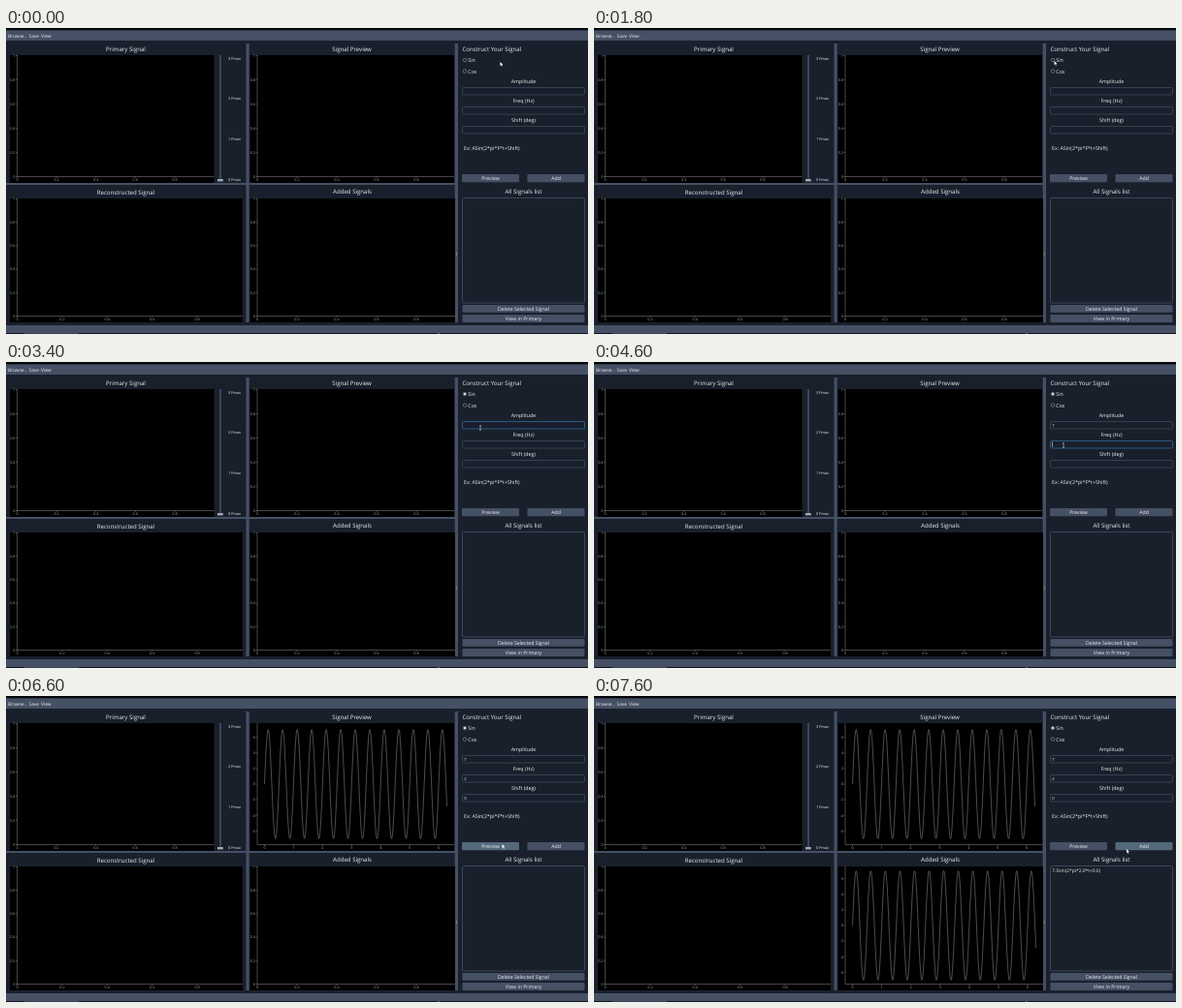
An HTML page with a canvas for the animation above (8000 ms loop, 600 by 316 pixels).

```html
<!DOCTYPE html>
<html lang="en">
<head>
<meta charset="utf-8">
<title>Signal composer</title>
<style>
html, body { margin: 0; width: 100%; height: 100%; overflow: hidden; background: #19202c; }
canvas { display: block; width: 600px; height: 316px; }
</style>
</head>
<body>
<canvas id="stage"></canvas>
<script>
const LOOP = 8000, STEP = 200;
const BG = '#19202c', BAR = '#465064', TEXT = '#eceef1', AXIS = '#767676';
const canvas = document.getElementById('stage');
const ctx = canvas.getContext('2d');
const ratio = window.devicePixelRatio || 1;
canvas.width = 600 * ratio;
canvas.height = 316 * ratio;
ctx.scale(ratio, ratio);
ctx.textRendering = 'geometricPrecision';

// Pointer stops: time, x, y
const pointerPath = [
  [0, 509.5, 35], [200, 479, 35], [800, 478, 35], [1400, 474.5, 34], [2200, 474.5, 34],
  [2800, 489, 68], [4200, 489, 68], [4600, 484, 86], [5200, 484, 86],
  [5600, 488.5, 105], [6000, 488.5, 105], [6400, 511.5, 153], [6800, 511.5, 153],
  [7200, 549, 158], [8000, 549, 158]
];

const fields = [
  { label: 'Amplitude', y: 61, value: '7', focus: 2800, typed: 3800, blur: 4400 },
  { label: 'Freq (Hz)', y: 81, value: '2', focus: 4400, typed: 5000, blur: 5600 },
  { label: 'Shift (deg)', y: 101, value: '0', focus: 5600, typed: 6000, blur: 6400 }
];

function rect(x, y, w, h, color) {
  ctx.fillStyle = color;
  ctx.fillRect(x, y, w, h);
}

function box(x, y, w, h, border) {
  ctx.beginPath();
  ctx.roundRect(x, y, w, h, 1);
  ctx.strokeStyle = border;
  ctx.lineWidth = 0.8;
  ctx.stroke();
}

function text(label, x, y, size, align = 'left', color = TEXT) {
  ctx.font = `${size}px "Open Sans", "Noto Sans", sans-serif`;
  ctx.textAlign = align;
  ctx.textBaseline = 'alphabetic';
  ctx.fillStyle = color;
  ctx.fillText(label, x, y + size * 0.36);
}

function line(x1, y1, x2, y2, color = AXIS, width = 0.6) {
  ctx.strokeStyle = color;
  ctx.lineWidth = width;
  ctx.beginPath();
  ctx.moveTo(x1, y1);
  ctx.lineTo(x2, y2);
  ctx.stroke();
}

function button(label, x, y, w, h, hover) {
  ctx.beginPath();
  ctx.roundRect(x, y, w, h, 1);
  ctx.fillStyle = hover ? '#546a7b' : BAR;
  ctx.fill();
  text(label, x + w / 2, y + h / 2, 5.2, 'center');
}

function plot({ x, y, right, bottom, unit, signal }) {
  rect(x, y, right - x, bottom - y, '#000');
  const left = x + 7.5, base = bottom - 6.5, top = y + 0.5;
  const middle = (top + base) / 2;
  line(left, y, left, base);
  line(left, base, right, base);
  const tickX = (label, px) => {
    line(px, base, px, base + 1.5);
    text(label, px, base + 3.6, 3.8, 'center', '#a5a5a5');
  };
  const tickY = (label, py) => {
    line(left - 1.5, py, left, py);
    text(label, left - 2, py, 3.8, 'right', '#a5a5a5');
  };
  if (!signal) {
    for (let i = 0; i <= 5; i++) {
      const label = String(i / 5);
      if (i < 5) tickX(label, left + i * unit);
      tickY(label, base + (top - base) * i / 5);
    }
    return;
  }
  const originX = left + 7.5, height = 8.05;
  const second = (right - originX - 7.4) / (2 * Math.PI);
  for (let i = 0; i <= 6; i++) tickX(String(i), originX + i * second);
  for (let v = -6; v <= 6; v += 2) tickY(String(v), middle - v * height);
  ctx.strokeStyle = '#9a9a9a';
  ctx.lineWidth = 0.5;
  ctx.beginPath();
  for (let i = 0; i <= 800; i++) {
    const s = i / 800 * 2 * Math.PI;
    ctx.lineTo(originX + s * second, middle - 7 * height * Math.sin(4 * Math.PI * s));
  }
  ctx.stroke();
}

function radio(label, y, checked) {
  ctx.beginPath();
  ctx.arc(473, y, 1.8, 0, 7);
  ctx.strokeStyle = '#a4acb7';
  ctx.lineWidth = 0.5;
  ctx.stroke();
  if (checked) {
    ctx.beginPath();
    ctx.arc(473, y, 1.1, 0, 7);
    ctx.fillStyle = '#fff';
    ctx.fill();
  }
  text(label, 476.3, y, 5.3);
}

function field({ label, y, value, focus, typed, blur }, t) {
  const focused = t >= focus && t < blur;
  text(label, 533.5, y - 6, 5.3, 'center');
  box(470.5, y + 0.5, 126, 7.5, focused ? '#2f6797' : '#3d485b');
  if (t >= typed) text(value, 472.3, y + 4.4, 4.2);
  if (focused && (t - focus) % 1000 < 500) {
    const caret = t >= typed ? 475.5 : 472.5;
    line(caret, y + 1.5, caret, y + 6.8, TEXT);
  }
}

function pointer(t) {
  const next = Math.max(1, pointerPath.findIndex(p => p[0] >= t));
  const [t0, x0, y0] = pointerPath[next - 1], [t1, x1, y1] = pointerPath[next];
  const k = (t - t0) / (t1 - t0), ease = k * k * (3 - 2 * k);
  const x = x0 + (x1 - x0) * ease, y = y0 + (y1 - y0) * ease;
  if (fields.some(f => x > 470 && y >= f.y && y <= f.y + 8)) {
    line(x, y - 2.2, x, y + 2.2, '#d5d9de');
    line(x - 1, y - 2.4, x + 1, y - 2.4, '#d5d9de', 0.5);
    line(x - 1, y + 2.4, x + 1, y + 2.4, '#d5d9de', 0.5);
    return;
  }
  ctx.save();
  ctx.translate(x, y);
  ctx.scale(0.9, 0.9);
  ctx.fillStyle = '#fff';
  ctx.fill(new Path2D('M0 0V4.5L1 3.6L1.8 5.3L2.6 4.9L1.8 3.3H3.2Z'));
  ctx.restore();
}

function frame(t) {
  const previewed = t >= 6600, added = t >= 7400;
  rect(0, 0, 600, 316, BG);
  rect(0, 0, 600, 2, '#05070b');
  rect(0, 2.5, 600, 10.5, BAR);
  text('Browse..', 2, 8, 4.8);
  text('Save', 23.5, 8, 4.8);
  text('View', 36, 8, 4.9);

  rect(0, 160, 466, 2, BAR);
  rect(247.5, 16, 3.2, 288, BAR);
  rect(462.7, 16, 3.3, 288, BAR);
  rect(464, 232, 1, 3, '#717b8a');
  rect(0, 307, 600, 8, BAR);
  rect(0, 315, 600, 1, '#10141d');
  rect(19, 315, 56, 1, '#3d4555');
  rect(445, 315, 2, 1, '#5a6270');

  text('Primary Signal', 123.5, 21.8, 6.1, 'center');
  text('Signal Preview', 356.5, 21.8, 6.1, 'center');
  text('Reconstructed Signal', 123.5, 169.5, 6.1, 'center');
  text('Added Signals', 357, 168.5, 6.1, 'center');
  plot({ x: 4, y: 28, right: 214.5, bottom: 160, unit: 40.6 });
  plot({ x: 251.5, y: 28, right: 462, bottom: 160, unit: 41, signal: previewed });
  plot({ x: 4, y: 176, right: 244, bottom: 304, unit: 46.4 });
  plot({ x: 251.5, y: 176, right: 463, bottom: 304, unit: 41, signal: added });

  rect(220.2, 28, 1.6, 130, BAR);
  rect(218, 156, 5.8, 2.4, '#a0a8b3');
  for (let i = 0; i <= 3; i++) text(i + ' Fmax', 229, 156.4 - i * 41.7, 3.9);

  text('Construct Your Signal', 470.5, 21.8, 6.1);
  radio('Sin', 33.1, t >= 2000);
  radio('Cos', 44.6, false);
  fields.forEach(f => field(f, t));
  text('Ex: ASin(2*pi*F*t+Shift)', 472, 124.5, 5.3);
  button('Preview', 470, 151, 59, 8.2, t >= 6400 && t < 7000);
  button('Add', 537.5, 151, 59, 8.2, t >= 7200);

  text('All Signals list', 533.5, 168.4, 6.1, 'center');
  box(470.5, 175.5, 126, 108.5, BAR);
  if (added) text('7.0sin(2*pi*2.0*t+0.0)', 472.3, 180, 4.9);
  button('Delete Selected Signal', 470.5, 286, 126, 7.8);
  button('View in Primary', 470.5, 296, 126, 8);
  pointer(t);
}

function tick(now) {
  frame(Math.floor(now % LOOP / STEP) * STEP);
  requestAnimationFrame(tick);
}
frame(0);
requestAnimationFrame(tick);
</script>
</body>
</html>
```
